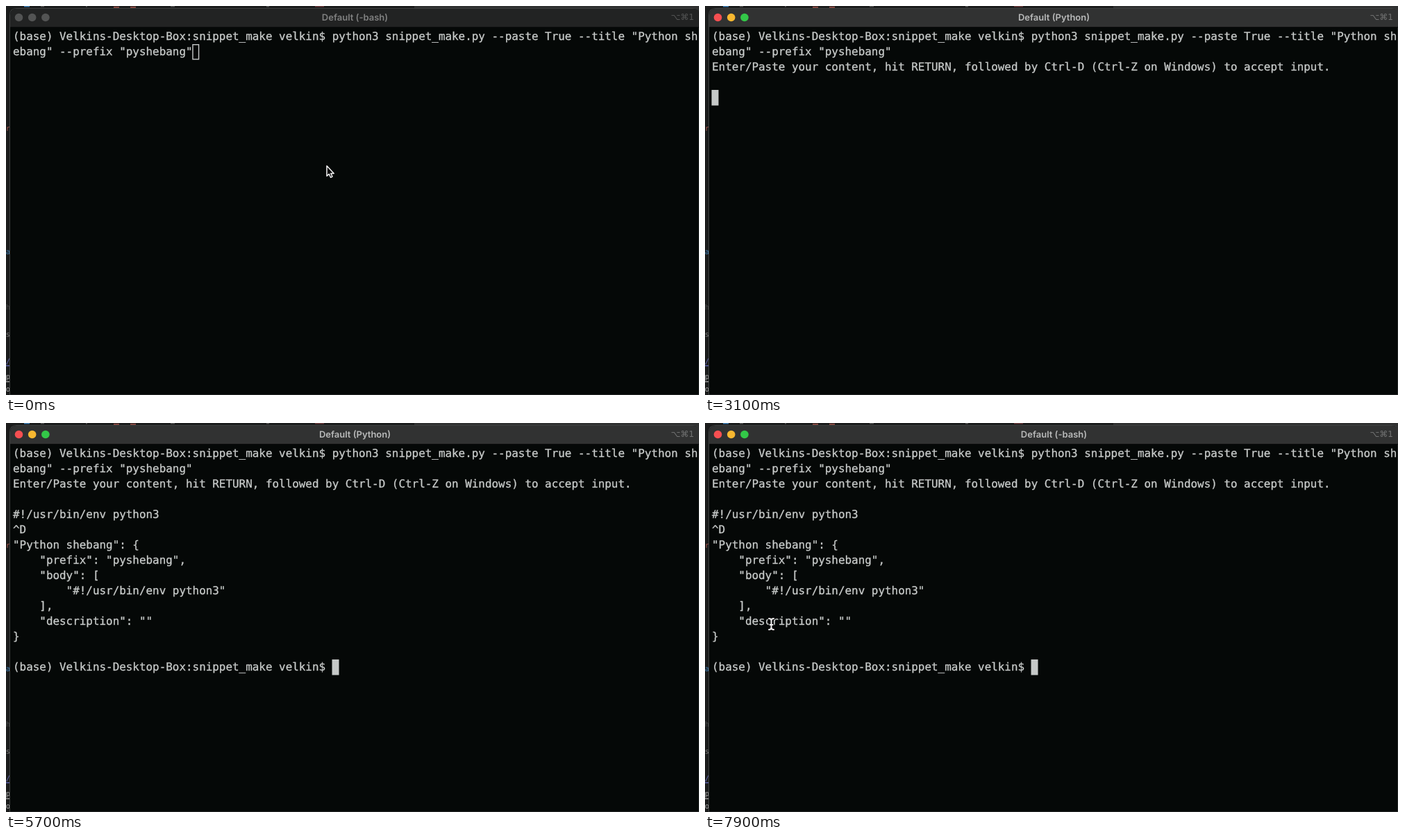
An HTML page for the animation above (8000 ms loop, 998x561 px).

```html
<!DOCTYPE html>
<html lang="en">
<head>
<meta charset="utf-8">
<title>Terminal</title>
<style>
html, body { margin: 0; width: 100%; height: 100%; overflow: hidden; background: #050807; }
svg { display: block; width: 100%; height: 100%; }
text { white-space: pre; text-rendering: geometricPrecision; }
.mono { font-family: "DejaVu Sans Mono", monospace; font-size: 15.92px; fill: #c9cccb; stroke: #c9cccb; stroke-width: 0.3px; }
.edge { font-family: "DejaVu Sans Mono", monospace; font-size: 10.5px; text-anchor: end; }
#title { font: 600 13px Inter, sans-serif; text-anchor: middle; }
#keys { font: 12px "DejaVu Sans", sans-serif; text-anchor: end; }
</style>
</head>
<body>
<svg id="stage" viewBox="0 0 998 561">
  <rect width="998" height="561" fill="#1b1c1c"/>
  <rect x="588" width="410" height="6" fill="#303131"/>
  <g id="behind"></g>
  <path d="M5.500 561V13Q5.500 3.500 15 3.500H989Q998 3.500 998 9V561Z" fill="#050807" stroke="#3e4040"/>
  <path id="bar" d="M6 30V13Q6 4 15 4H989Q998 4 998 9V30Z"/>
  <path d="M6 30.500H998" stroke="#0c0d0d"/>
  <g id="lights"></g>
  <text id="title" x="502.500" y="20.700"></text>
  <text id="keys" x="991" y="20">⌥⌘1</text>
  <g id="lines"></g>
  <rect id="caret"/>
  <path id="arrow" d="M462 230.500V245.300L465.200 242.300L467.500 247.200L470 246.100L467.800 241.400H472.200Z"
        fill="#080808" stroke="#f2f2f2" stroke-width="1.500" stroke-linejoin="round"/>
  <g id="beam" fill="none" stroke-linecap="round">
    <path d="M-3.500 -8Q0 -8 0 -5Q0 -8 3.500 -8M0 -5V5M-3.500 8Q0 8 0 5Q0 8 3.500 8M-2 1H2" stroke="#050505" stroke-width="4"/>
    <path d="M-3.500 -8Q0 -8 0 -5Q0 -8 3.500 -8M0 -5V5M-3.500 8Q0 8 0 5Q0 8 3.500 8M-2 1H2" stroke="#f0f0f0" stroke-width="2"/>
  </g>
</svg>
<script>
const LOOP = 8000, LEFT = 10, TOP = 33, ROW = 22, COL = 9.584;
const FOCUS = 700, ENTER = 2500, READY = 2900, PASTE = 4900, NEWLINE = 5100, OUTPUT = 5700, DONE = 6500;
const $ = id => document.getElementById(id);

function add(parent, tag, attrs, text = "") {
  const el = document.createElementNS("http://www.w3.org/2000/svg", tag);
  set(el, attrs);
  el.textContent = text;
  parent.appendChild(el);
  return el;
}
function set(el, attrs) {
  for (const k in attrs) el.setAttribute(k, attrs[k]);
}
const show = (el, on) => set(el, { visibility: on ? "visible" : "hidden" });

const prompt = "(base) Velkins-Desktop-Box:snippet_make velkin$ ";
// Each line: time of appearance, text
const script = [
  [0, prompt + 'python3 snippet_make.py --paste True --title "Python sh'],
  [0, 'ebang" --prefix "pyshebang"'],
  [READY, "Enter/Paste your content, hit RETURN, followed by Ctrl-D (Ctrl-Z on Windows) to accept input."],
  [READY, ""],
  [PASTE, "#!/usr/bin/env python3"],
  [OUTPUT, "^D"],
  [OUTPUT, '"Python shebang": {'],
  [OUTPUT, '    "prefix": "pyshebang",'],
  [OUTPUT, '    "body": ['],
  [OUTPUT, '        "#!/usr/bin/env python3"'],
  [OUTPUT, "    ],"],
  [OUTPUT, '    "description": ""'],
  [OUTPUT, "}"],
  [OUTPUT, ""],
  [OUTPUT, prompt]
];
const lines = script.map(([at, text], i) => ({
  at, el: add($("lines"), "text", { class: "mono", x: LEFT, y: TOP + 16 + i * ROW }, text)
}));

// Caret stops: time, column, row
const stops = [
  [0, 27, 1], [ENTER, 0, 2], [READY, 0, 4], [PASTE, 22, 4], [NEWLINE, 0, 5], [OUTPUT, 48, 14]
];

// Pointer stops, one per 100 ms from WAKE
const WAKE = 7200;
const path = [[463, 232], [401, 221], [313, 198], [212, 169], [168, 160], [148, 208], [120, 264], [95.5, 290]];

const lights = ["#f64f51", "#f8b830", "#33c748"].map((color, i) => ({
  color, el: add($("lights"), "circle", { cx: 18.5 + i * 19.2, cy: 16.5, r: 5.8 })
}));

// Slivers of the editor behind the window
[["or", 180, "#a6564d"], ["ba", 358, "#3f7fb5"], ["lh", 438, "#484a4a"], ["rs", 477, "#777"],
 ["/", 516, "#666bb8"], ["p", 538, "#aaa"], ["ro", 556, "#aaa"]].forEach(([s, y, fill]) =>
  add($("behind"), "text", { class: "edge", x: 6, y, fill }, s));
[[0, 518, 5, "#5a60a8"], [0, 541, 5, "#999"], [26, 0, 8, "#3f7fb5"], [50, 0, 5, "#555"], [115, 0, 2, "#555"],
 [155, 1, 8, "#a6564d"], [179, 1, 8, "#a6564d"], [237, 0, 6, "#555"], [375, 0, 4, "#555"],
 [445, 0, 13, "#6a3a3c"]].forEach(([x, y, width, fill]) =>
  add($("behind"), "rect", { x, y, width, height: 1.5, fill }));

function draw(t) {
  const active = t >= FOCUS;
  set($("bar"), { fill: active ? "#313232" : "#222323" });
  set($("title"), { fill: active ? "#b9baba" : "#808181" });
  set($("keys"), { fill: active ? "#737474" : "#555656" });
  $("title").textContent = t >= READY && t < DONE ? "Default (Python)" : "Default (-bash)";
  lights.forEach(l => set(l.el, { fill: active ? l.color : "#535454" }));
  lines.forEach(l => show(l.el, t >= l.at));

  const [, col, row] = stops.filter(s => s[0] <= t).pop();
  const inset = active ? 0 : 0.7;
  set($("caret"), {
    x: LEFT - 0.5 + col * COL + inset, y: TOP + row * ROW + inset,
    width: 10 - 2 * inset, height: ROW + 0.5 - 2 * inset,
    fill: active ? "#c6c9c8" : "none", stroke: active ? "none" : "#c6c9c8", "stroke-width": 1.4
  });

  show($("arrow"), !active);
  show($("beam"), active && (t < ENTER || t >= WAKE));
  const step = Math.max(0, Math.min(path.length - 1, Math.floor((t - WAKE) / 100)));
  set($("beam"), { transform: `translate(${path[step]})` });
}

let start;
function tick(now) {
  start ??= now;
  draw((now - start) % LOOP);
  requestAnimationFrame(tick);
}
draw(0);
requestAnimationFrame(tick);
</script>
</body>
</html>
```
